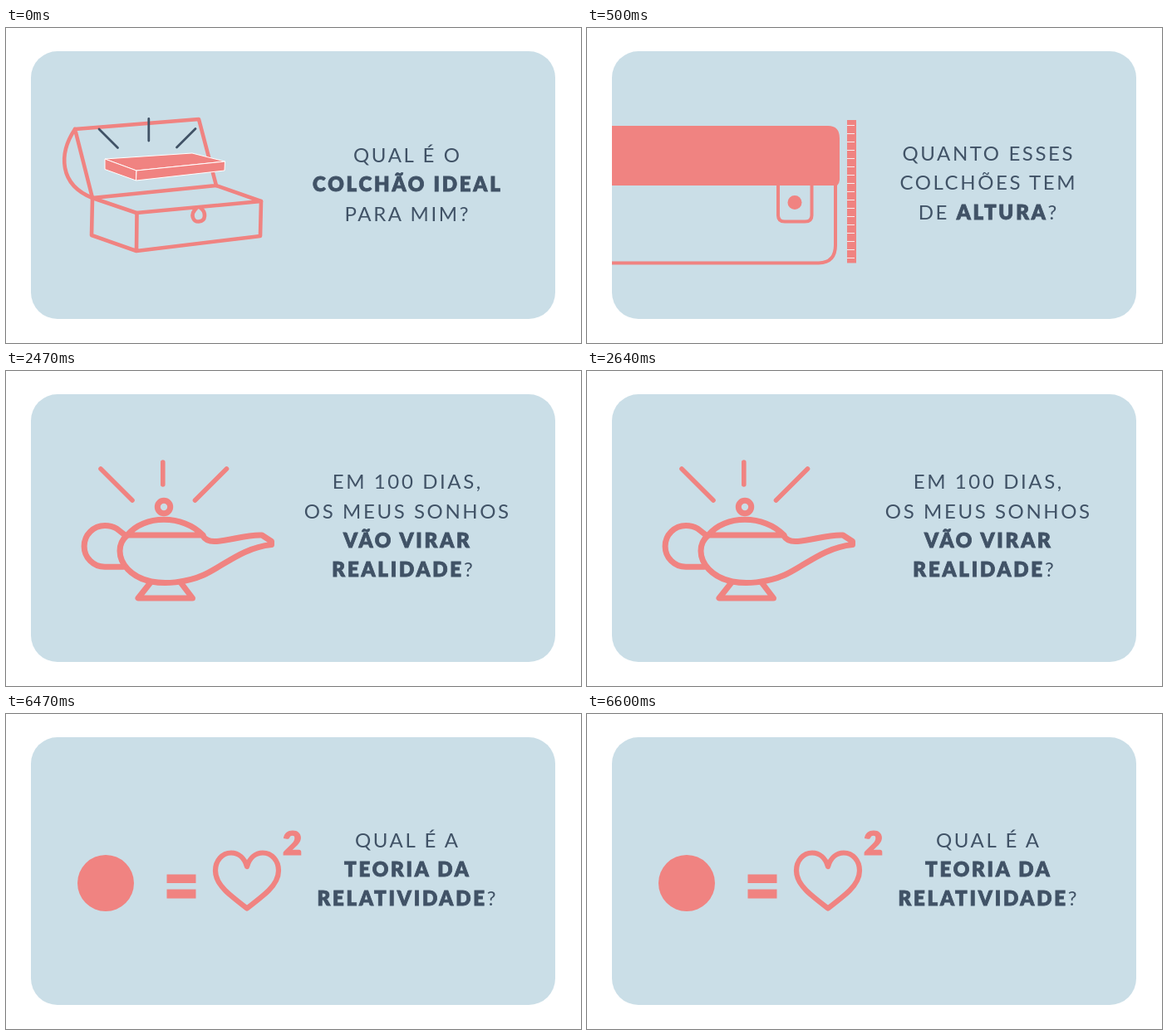
Recreate the animation shown at these times as an HTML page. Size 692x380 px, loop 8000 ms.

```html
<!DOCTYPE html>
<html lang="pt">
<head>
<meta charset="utf-8">
<title>Perguntas sobre colchões</title>
<style>
  html, body { margin: 0; width: 100%; height: 100%; overflow: hidden; background: #fff; }
  svg { display: block; width: 692px; height: 380px; }
  .scene { visibility: hidden; }
  .scene.on { visibility: visible; }
  .line { fill: none; stroke: #f08381; stroke-linecap: round; stroke-linejoin: round; }
  .fill { fill: #f08381; }
  text { font-family: Lato, "Open Sans", sans-serif; white-space: pre; }
  .copy { font-size: 24px; letter-spacing: 2.6px; fill: #405266; text-anchor: middle; }
  .copy .b { font-weight: 900; letter-spacing: 2.8px; stroke: #405266; stroke-width: .8px; }
  .two { font-size: 40px; font-weight: 900; stroke: #f08381; stroke-width: 1.2px; }
</style>
</head>
<body>
<svg viewBox="0 0 692 380">
  <rect x="30" y="28" width="631" height="323" rx="32" fill="#cadee7"/>

  <!-- treasure chest -->
  <g class="scene">
    <g class="line" stroke-width="4.6">
      <path d="M83 122L232 110L253 190L104 205Z"/>
      <path d="M83 122C63 152 64 189 104 205"/>
      <path d="M104 205L157 223L307 209L253 190"/>
      <path d="M104 205L103 250L157 269L306 251L307 209M157.5 223L157 269"/>
      <path d="M229 217.5C221 225 225 234 232 233.5C241 233 241 222 234 217"/>
    </g>
    <g class="fill" stroke="#fff" stroke-width="1" stroke-linejoin="round">
      <path d="M119 158L224 151L263.5 161L157 172Z"/>
      <path d="M119 158L157 172L156.5 184L119 170.5Z"/>
      <path d="M157 172L263.5 161L263 172L156.5 184Z"/>
    </g>
    <path d="M112 122L134.5 144.5M171.8 109.5V136M228 121.5L205.5 144"
      stroke="#405266" stroke-width="2.8" stroke-linecap="round"/>
  </g>

  <!-- mattress and ruler -->
  <g class="scene">
    <path class="fill" d="M30 118H290Q304 118 304 133V183Q304 187 301 190H30Z"/>
    <g class="line" stroke-width="4" style="stroke-linecap:butt">
      <path d="M30 283.5H279Q299 283 299 262V188"/>
      <path d="M230 188V226Q230 233.5 238 233.5H262.5Q270.5 233.5 270.5 226V188"/>
    </g>
    <circle class="fill" cx="250" cy="210.5" r="8.5"/>
    <rect class="fill" x="313" y="111" width="11" height="172.5"/>
    <path id="ticks" stroke="#f6ebed" stroke-width="1.1"/>
  </g>

  <!-- lamp -->
  <g class="scene">
    <path class="line" stroke-width="5.6" d="M114 118L152 156M188.8 110V137M265.5 118L227.5 156"/>
    <g class="line" stroke-width="7">
      <circle cx="190" cy="164" r="7.7"/>
      <path d="M146 198C166 173 213 173 237 198Z"/>
      <path d="M237 199Q241 206 252 205.5C268 205 290 197 308 198L319.5 205.5V209.5C285 213 262 235 238 246C216 256 190 257 175 254C150 249 137 232 137 217C137 210 140 203 146 198"/>
      <path d="M142 197L133 190Q127 186.5 119 186.5A24.7 24.7 0 0 0 119 236.3H141"/>
      <path d="M174 255L159 274H224.5L210 255"/>
    </g>
  </g>

  <!-- magnifier -->
  <g class="scene">
    <g class="line" stroke-width="4.6">
      <path d="M210 168L84 181L151 204L214 198M84 181L83 203L150 226L231 218M151 204L150 226"/>
      <path d="M306 177L335 186L333 208L300 211M335 186L306 189"/>
      <path d="M288 218L321 251A8 8 0 0 0 333 240.5L299 207M298 228L308.5 217.5"/>
    </g>
    <g class="line" stroke-width="5">
      <circle cx="258.3" cy="178.7" r="48.4"/>
      <circle cx="258.3" cy="178.7" r="38.3"/>
    </g>
    <circle class="fill" cx="258" cy="179" r="13"/>
  </g>

  <!-- equation -->
  <g class="scene">
    <circle class="fill" cx="120" cy="204" r="34"/>
    <path class="fill" d="M193.5 193.5h35v10.5h-35zM193.5 211.5h35v11h-35z"/>
    <path class="line" stroke-width="6.2" d="M290 184C287 174 280 167.5 271 167.5C260 167.5 252 177 252 189C252 198 257 206 264 213Q270 219 290 234.5Q310 219 316 213C323 206 328 198 328 189C328 177 320 167.5 309 167.5C300 167.5 293 174 290 184Z"/>
    <text class="two fill" x="333" y="169.5">2</text>
  </g>
</svg>
<script>
  const LOOP = 8000;
  // Each line: baseline, text (bold between asterisks), optional centre
  const scenes = [
    { at: 0, copy: [[162, "QUAL É O"], [197, "*COLCHÃO IDEAL*"], [233, "PARA MIM?"]] },
    { at: 500, copy: [[160, "QUANTO ESSES"], [195, "COLCHÕES TEM"], [231, "DE *ALTURA*?"]] },
    { at: 2470, copy: [[142, "EM 100 DIAS,"], [178, "OS MEUS SONHOS"],
                       [213, "*VÃO VIRAR*"], [248, "*REALIDADE*?", 477]] },
    { at: 4470, copy: [[160, "O QUE TEM"], [195, "*DENTRO DO*"], [231, "*MEU COLCHÃO*?", 477]] },
    { at: 6470, copy: [[161, "QUAL É A"], [196, "*TEORIA DA*"], [231, "*RELATIVIDADE*?"]] }
  ];

  function add(parent, tag, attrs, text = "") {
    const el = document.createElementNS("http://www.w3.org/2000/svg", tag);
    for (const key in attrs) el.setAttribute(key, attrs[key]);
    el.textContent = text;
    return parent.appendChild(el);
  }

  const groups = [...document.querySelectorAll(".scene")];
  scenes.forEach(({ copy }, i) => {
    for (const [y, text, x = 482] of copy) {
      const line = add(groups[i], "text", { class: "copy", x: x + 1.3, y });
      text.split("*").forEach((part, n) => {
        if (part) add(line, "tspan", { class: n % 2 ? "b" : "r" }, part);
      });
    }
  });

  let ticks = "";
  for (let y = 117.5; y < 280; y += 10) ticks += `M313 ${y}h9`;
  document.getElementById("ticks").setAttribute("d", ticks);

  function draw() {
    const t = performance.now() % LOOP;
    const current = scenes.filter(s => s.at <= t).length - 1;
    groups.forEach((g, i) => g.classList.toggle("on", i === current));
    requestAnimationFrame(draw);
  }
  draw();
</script>
</body>
</html>
```
